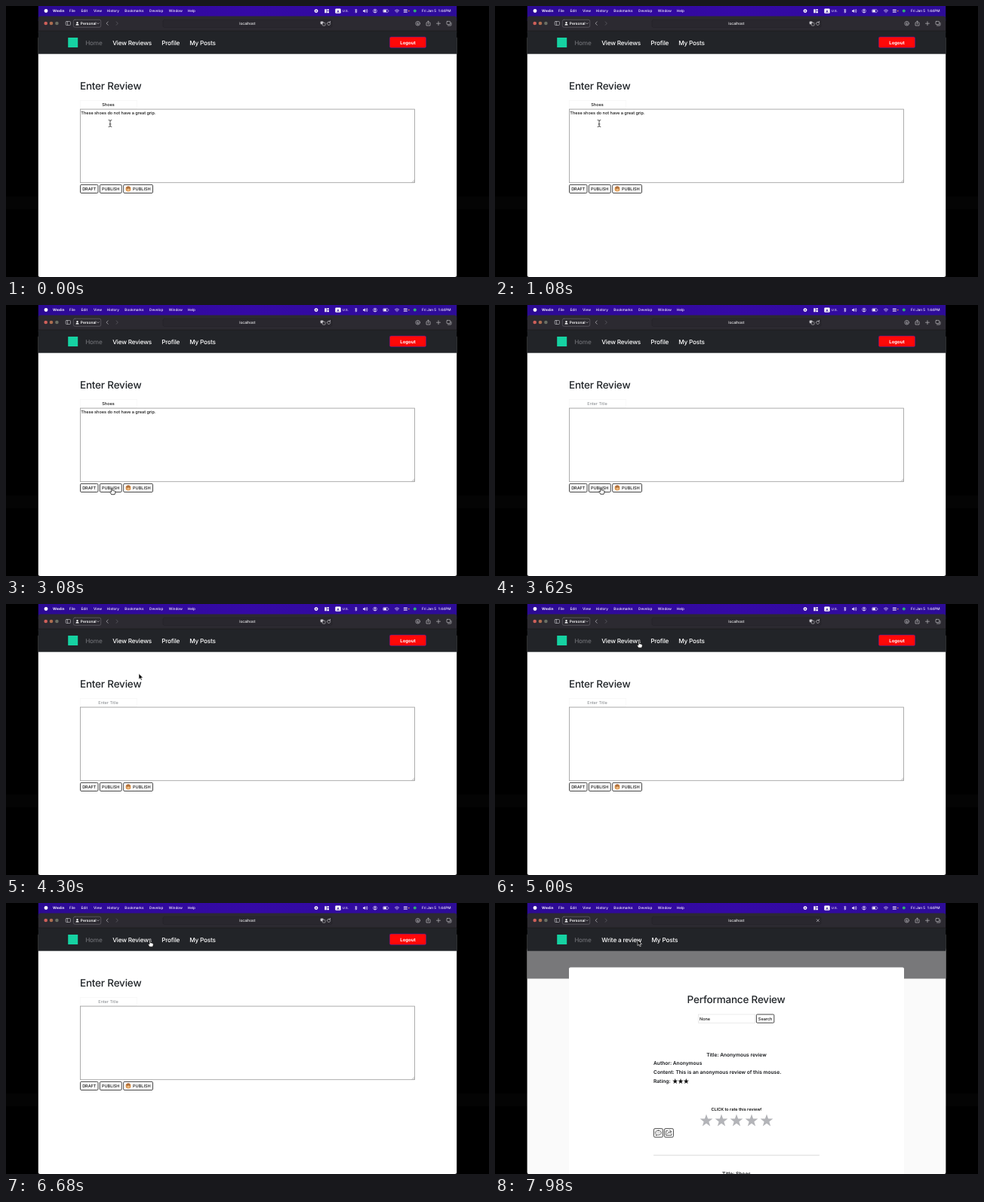
Write an HTML page that moves like this. It is 640 by 360 pixels and loops after 8 s.

```html
<!DOCTYPE html>
<html lang="en">
<head>
<meta charset="utf-8">
<title>Review form</title>
<style>
  html, body { margin: 0; width: 100%; height: 100%; overflow: hidden; background: #000; }
  svg { display: block; width: 100vw; height: 100vh; }
  text { font-family: Inter, "Noto Sans", sans-serif; white-space: pre; text-rendering: geometricPrecision; }
  .menu { font-size: 4.7px; font-weight: 500; fill: #f4f0ff; }
  .nav { font-size: 8.2px; font-weight: 500; letter-spacing: -.18px; fill: #fff; }
  .head { font-size: 13.5px; font-weight: 500; letter-spacing: -.2px; fill: #212529; }
  .ui { font-size: 5.55px; font-weight: 500; letter-spacing: -.02px; fill: #111; }
  .body { font-size: 6.65px; font-weight: 600; fill: #16181b; }
  .mid { text-anchor: middle; }
  .line { fill: none; stroke-width: .7; stroke-linecap: round; stroke-linejoin: round; }
  .btn { fill: #fff; stroke: #262626; stroke-width: .85; }
</style>
</head>
<body>
<svg id="stage" viewBox="0 0 640 360">
  <defs>
    <linearGradient id="bar">
      <stop offset="0" stop-color="#2c0a94"/>
      <stop offset=".5" stop-color="#3509a6"/>
      <stop offset="1" stop-color="#2d0c98"/>
    </linearGradient>
  </defs>
  <rect width="640" height="360" fill="#000"/>
  <rect y="253" width="640" height="17" fill="#040404"/>
  <rect x="42.8" y="0" width="554.4" height="20" fill="url(#bar)"/>
  <rect x="42.8" y="40" width="554.4" height="320" rx="2.5" fill="#fff"/>

  <g id="form">
    <text class="head" x="98" y="110.5">Enter Review</text>
    <rect x="98.5" y="125.5" width="75" height="11" fill="#fff" stroke="#f6f6f6" stroke-width=".6"/>
    <text id="title" class="ui mid" x="135.5" y="133.4"></text>
    <rect x="98.5" y="137.1" width="443" height="97.6" fill="#fff" stroke="#9a9a9a" stroke-width=".8"/>
    <path class="line" d="M538 234.2l3-3M539.8 234.2l1.2-1.2" stroke="#888" style="stroke-width:.5"/>
    <text id="review" class="ui" x="99.3" y="144.4">These shoes do not have a great grip.</text>
    <g id="buttons"></g>
    <g>
      <circle cx="162" cy="243" r="3.5" fill="#dc9650"/>
      <path d="M158.7 241.8a3.5 3.5 0 0 1 6.4-.4l-2 .1-1.3.6-1.4-.6z" fill="#a8693a"/>
      <ellipse cx="162.2" cy="244.1" rx="1.9" ry="1.3" fill="#f0c08a"/>
      <circle cx="160.7" cy="242.8" r=".5" fill="#5a3a25"/>
      <circle cx="163.2" cy="242.8" r=".5" fill="#5a3a25"/>
    </g>
  </g>

  <g id="list">
    <rect x="42.8" y="60" width="554.4" height="300" rx="2.5" fill="#fafafa"/>
    <rect x="42.8" y="60" width="554.4" height="40.5" fill="#78787a"/>
    <path d="M98 360V87.5q0-2 2-2H540q2 0 2 2V360z" fill="#fff"/>
    <text class="head mid" x="319.6" y="132.6">Performance Review</text>
    <rect x="269.3" y="148" width="75.5" height="11.2" fill="#fff" stroke="#ddd" stroke-width=".6"/>
    <text class="ui" x="271" y="155.6">None</text>
    <rect class="btn" x="346.4" y="148" width="23.4" height="11.2" rx="1.2"/>
    <text class="ui mid" x="358.1" y="155.6">Search</text>
    <text class="body mid" x="320" y="203.7">Title: Anonymous review</text>
    <text class="body" x="210" y="215.4">Author: Anonymous</text>
    <text class="body" x="210" y="227.3">Content: This is an anonymous review of this mouse.</text>
    <text class="body" x="210" y="239.2">Rating:</text>
    <text class="ui mid" x="320" y="275.7" style="font-weight:600">CLICK to rate this review!</text>
    <g id="stars"></g>
    <rect class="btn" x="210.4" y="299.7" width="12" height="11.4" rx="1.6"/>
    <path class="line" d="M216.4 302.3c2.5 0 4 1.3 4 2.9s-1.5 2.9-4 2.9l-1.2-.1-2 1 .4-1.7c-.8-.6-1.2-1.3-1.2-2.1 0-1.6 1.5-2.9 4-2.9zM214.5 305.2h.1M216.4 305.2h.1M218.3 305.2h.1" stroke="#222"/>
    <rect class="btn" x="224.4" y="299.7" width="12" height="11.4" rx="1.6"/>
    <path class="line" d="M229 302.6h-2.4v6h7.2v-2M228.6 306.6q.5-2.9 4-2.9M231.5 301.9l2.6 1.9-2.6 2" stroke="#222"/>
    <rect x="210" y="334.7" width="220" height=".7" fill="#c9c9c9"/>
    <text class="body mid" x="320" y="361.7">Title: Shoes</text>
  </g>

  <path d="M42.8 36V17q0-3.4 3.4-3.4H593.8q3.4 0 3.4 3.4V36z" fill="#2c2a31"/>
  <rect x="42.8" y="33" width="554.4" height="30.7" fill="#222428"/>
  <rect x="42.8" y="32.7" width="554.4" height=".6" fill="#17171a"/>

  <g id="menus">
    <circle cx="53" cy="6.5" r="2.4" fill="#fff"/>
    <circle cx="411" cy="6.6" r="2.4" fill="#fff"/>
    <circle cx="411" cy="6.6" r=".9" fill="#3509a6"/>
    <path d="M422.3 4.2h2.3v5h-2.3zM425.4 4.2h2.5v2.1h-2.5zM425.4 7h2.5v2.2h-2.5z" fill="#fff"/>
    <rect x="436.3" y="3.6" width="7.4" height="6.2" rx="1.2" fill="#fff"/>
    <text class="mid" x="440" y="8.5" font-size="4.8" font-weight="600" fill="#2c0a94">A</text>
    <path class="line" d="M462.6 5l2.4 2.8-1.3 1.4V4l1.3 1.4L462.6 8" stroke="#efeaff"/>
    <path d="M473 5.7h1.2l1.6-1.5v4.9l-1.6-1.5H473z" fill="#efeaff"/>
    <path class="line" d="M477 5.3q.9 1.3 0 2.6M478.3 4.4q1.5 2.2 0 4.4" stroke="#efeaff"/>
    <circle cx="489" cy="6.6" r="2.4" fill="none" stroke="#efeaff" stroke-width=".6"/>
    <circle cx="489" cy="6" r=".9" fill="#efeaff"/>
    <path d="M487.3 8.2q1.7-1.6 3.4 0-1.7 1.3-3.4 0z" fill="#efeaff"/>
    <rect x="499.6" y="4.6" width="6.6" height="4" rx="1" fill="none" stroke="#cfc5f0" stroke-width=".6"/>
    <rect x="500.3" y="5.3" width="3.6" height="2.6" fill="#fff"/>
    <path d="M507 6v1.3" stroke="#cfc5f0" stroke-width=".6"/>
    <path class="line" d="M515.3 6q2.7-2.5 5.4 0M516.5 7.4q1.5-1.4 3 0M518 8.7h.1" stroke="#efeaff"/>
    <path class="line" d="M527.4 5.4h3.8M527.4 7.9h3.8" stroke="#efeaff" style="stroke-width:1.3"/>
    <circle cx="533.8" cy="6.6" r=".8" fill="#e8a23c"/>
    <circle cx="541.8" cy="6.6" r="2" fill="#2fae74"/>
    <text class="menu" x="445.8" y="8.4" style="font-size:4.2px">U.S.</text>
  </g>

  <g>
    <circle cx="52.7" cy="23" r="2.3" fill="#cf5f5a"/>
    <circle cx="60" cy="23" r="2.3" fill="#ad6d50"/>
    <circle cx="67.4" cy="23" r="2.3" fill="#6a6f64"/>
    <g class="line" stroke="#b9b8bd">
      <rect x="79.2" y="20.5" width="6.3" height="5" rx="1"/>
      <path d="M81.4 20.5v5M135.2 20.9l-2.1 2.2 2.1 2.2"/>
      <path d="M146.2 20.9l2.1 2.2-2.1 2.2" stroke="#65646a"/>
      <rect x="89.3" y="18.2" width="36.4" height="10" rx="2" stroke="#67656e"/>
      <path d="M120.7 22.6l1.3 1.3 1.3-1.3"/>
      <circle cx="545.7" cy="23.2" r="2.8"/>
      <path d="M545.7 21.6v3M544.5 23.5l1.2 1.2 1.2-1.2"/>
      <path d="M558 22.1h-1v3.9h5v-3.9h-1M559.5 24.1v-4M558.2 21.2l1.3-1.3 1.3 1.3"/>
      <path d="M573 20.7v5M570.5 23.2h5"/>
      <rect x="584" y="20.4" width="4.6" height="4.2" rx=".7"/>
      <path d="M585.6 26h3.6q.8 0 .8-.8v-3"/>
    </g>
    <circle cx="94.5" cy="22.1" r="1.2" fill="#fff"/>
    <path d="M92.4 25.6q.2-2 2.1-2t2.1 2z" fill="#fff"/>
    <text x="98.8" y="25" font-size="4.9" font-weight="600" fill="#fff">Personal</text>
    <rect x="208" y="18" width="224" height="10.5" rx="2.2" fill="#29272e" stroke="#222027" stroke-width=".5"/>
    <text class="mid" x="319.8" y="25" font-size="4.9" font-weight="500" fill="#f2f2f4">localhost</text>
    <g id="idle">
      <rect x="416.7" y="20.5" width="3.8" height="3.8" rx=".8" fill="#c9c8cd"/>
      <rect x="419.3" y="22.3" width="3.8" height="3.8" rx=".8" fill="#29272e" stroke="#c9c8cd" stroke-width=".6"/>
      <path class="line" d="M429.4 22a2.1 2.1 0 1 0 .4 1.7M427.9 21.9h1.7v-1.6" stroke="#c9c8cd"/>
    </g>
    <path id="busy" class="line" d="M426.3 21.7l3 3M429.3 21.7l-3 3" stroke="#c9c8cd"/>
  </g>

  <rect x="82.2" y="42" width="13" height="13" fill="#16d2a2"/>
  <text class="nav" x="105.2" y="51.6" style="fill:#6c6d72">Home</text>
  <g id="links"></g>
  <g id="logout">
    <rect x="508.3" y="41" width="48.4" height="14.6" rx="2" fill="#ff0808" stroke="#3a1f9c" stroke-width=".6"/>
    <text class="mid" x="532.5" y="50.6" font-size="6" font-weight="700" fill="#fff">Logout</text>
  </g>

  <g id="cursor">
    <path id="ibeam" class="line" d="M-1.9-4.6Q0-4.6 0-3.4V3.4Q0 4.6-1.9 4.6M1.9-4.6Q0-4.6 0-3.4M0 3.4Q0 4.6 1.9 4.6M-1 .9H1" stroke="#111"/>
    <path id="arrow" d="M0 0V7.6L1.8 6 3 8.8 4.3 8.2 3.1 5.5H5.5z" fill="#000" stroke="#fff" stroke-width=".6"/>
    <path id="hand" d="M-.8.8Q0-.3.8.8V3.6Q1.6 3 2.2 3.9 3 3.4 3.5 4.3 4.5 4 4.5 5.2 4.6 7 3.6 8.8H-.8Q-1.6 7-2.8 5.6-2.8 4.3-.8 5.4z" fill="#fff" stroke="#111" stroke-width=".8" stroke-linejoin="round"/>
  </g>
</svg>
<script>
  const LOOP = 8000, CLEAR = 3460, NAVIGATE = 7420;
  const NS = "http://www.w3.org/2000/svg";
  const $ = id => document.getElementById(id);

  function add(parent, tag, attrs, text) {
    const el = document.createElementNS(NS, tag);
    for (const key in attrs) el.setAttribute(key, attrs[key]);
    if (text) el.textContent = text;
    return parent.appendChild(el);
  }

  function addStar(x, y, r, fill) {
    let d = "";
    for (let i = 0; i < 10; i++) {
      const a = i * Math.PI / 5, q = i % 2 ? r * .4 : r;
      d += (i ? "L" : "M") + (x + q * Math.sin(a)).toFixed(2) + " " + (y - q * Math.cos(a)).toFixed(2);
    }
    add($("stars"), "path", { d: d + "z", fill });
  }

  [["Wexlin", 62, 700], ["File", 84], ["Edit", 99.5], ["View", 116], ["History", 133.8],
   ["Bookmarks", 157.3], ["Develop", 190], ["Window", 215.7], ["Help", 240.7],
   ["Fri Jan 5  1:44PM", 551]].forEach(([label, x, weight = 500]) =>
    add($("menus"), "text", { class: "menu", x, y: 8.4, style: `font-weight:${weight}` }, label));

  [["DRAFT", 98.5, 23.5, 110.3], ["PUBLISH", 124.4, 28.8, 138.7], ["PUBLISH", 155.7, 38.8, 179.8]]
    .forEach(([label, x, width, mid]) => {
      add($("buttons"), "rect", { class: "btn", x, y: 237.4, width, height: 11.1, rx: 1.4 });
      add($("buttons"), "text", { class: "ui mid", x: mid, y: 245 }, label);
    });

  for (let i = 0; i < 5; i++) addStar(280 + 20 * i, 289.3, 8.8, "#b3b4b8");
  for (let i = 0; i < 3; i++) addStar(238.7 + 7.3 * i, 236.9, 3.8, "#111");

  const linkSets = [
    [["View Reviews", 141.2], ["Profile", 206.2], ["My Posts", 243.2]],
    [["Write a review", 141.2], ["My Posts", 207.5]]
  ].map(set => {
    const group = add($("links"), "g", {});
    set.forEach(([label, x]) => add(group, "text", { class: "nav", x, y: 51.6 }, label));
    return group;
  });

  // time, x, y of the pointer
  const path = [
    [0, 138, 156], [1400, 138, 156], [2100, 140, 236.6], [2400, 140.4, 242.9], [3600, 140.4, 242.9],
    [4260, 176, 92.5], [4400, 176, 92.5], [4950, 190.8, 49.4], [7350, 190.8, 49.4],
    [7480, 189, 49], [LOOP, 189, 49]
  ];

  function pointer(t) {
    const i = path.findIndex(p => p[0] > t);
    const [t0, x0, y0] = path[i - 1], [t1, x1, y1] = path[i];
    const u = (t - t0) / (t1 - t0), k = u * u * (3 - 2 * u);
    return [x0 + (x1 - x0) * k, y0 + (y1 - y0) * k];
  }

  const within = (x, y, l, t, r, b) => x > l && x < r && y > t && y < b;

  function cursorKind(x, y, onList) {
    if (onList) return "arrow";
    if (within(x, y, 98, 237.2, 195, 249) || within(x, y, 141, 42, 195, 56)) return "hand";
    if (within(x, y, 98, 125, 542, 235)) return "ibeam";
    return "arrow";
  }

  const show = (el, on) => { el.style.display = on ? "" : "none"; };

  function draw(t) {
    const onList = t >= NAVIGATE, cleared = t >= CLEAR;
    show($("form"), !onList);
    show($("list"), onList);
    show($("logout"), !onList);
    show($("idle"), !onList);
    show($("busy"), onList);
    linkSets.forEach((group, i) => show(group, i === +onList));

    show($("review"), !cleared);
    $("title").textContent = cleared ? "Enter Title" : "Shoes";
    $("title").style.fill = cleared ? "#85888c" : "#111";
    $("title").style.fontWeight = cleared ? 400 : 500;

    const [x, y] = pointer(t), kind = cursorKind(x, y, onList);
    $("cursor").setAttribute("transform", `translate(${x} ${y})`);
    for (const id of ["ibeam", "arrow", "hand"]) show($(id), id === kind);
  }

  const start = performance.now();
  function tick() {
    draw((performance.now() - start) % LOOP);
    requestAnimationFrame(tick);
  }
  tick();
</script>
</body>
</html>
```
